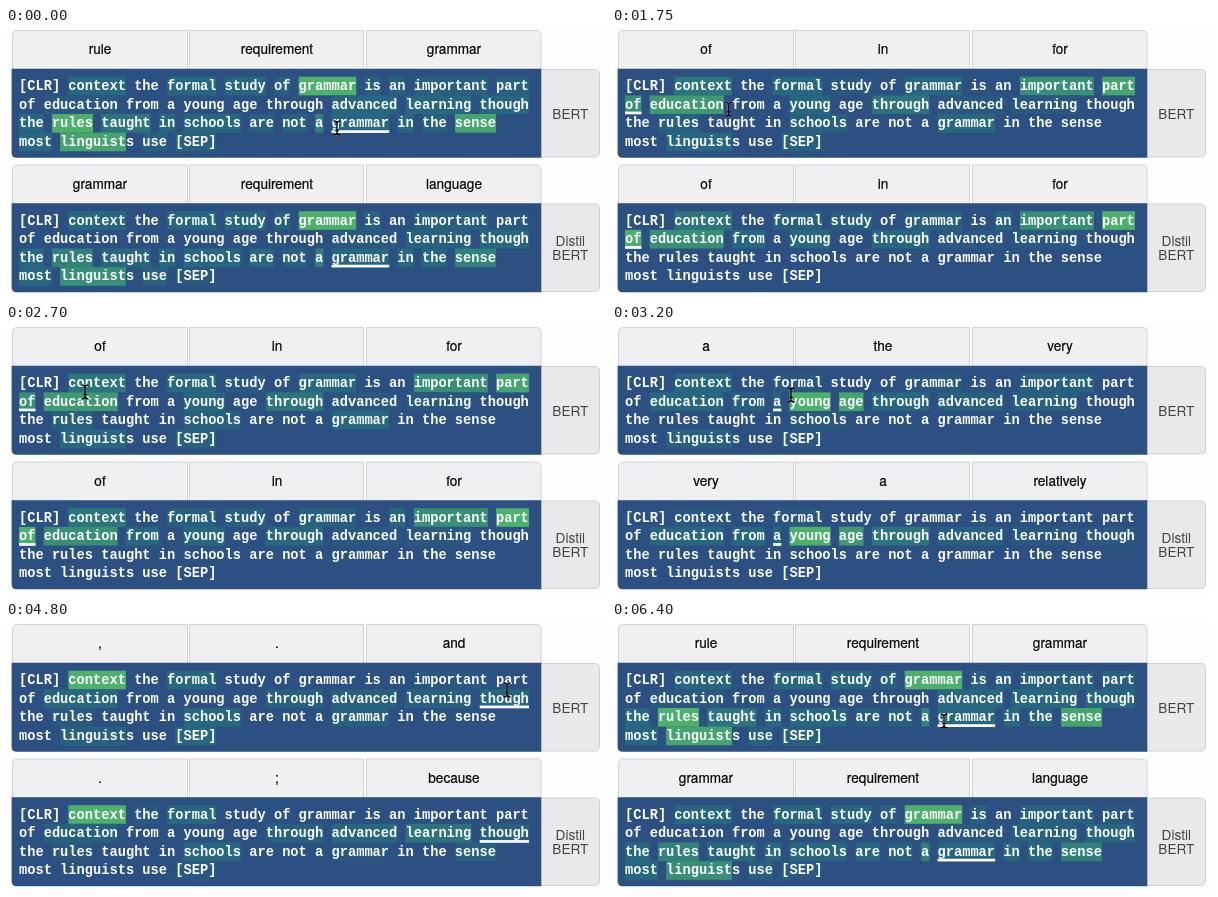
Write an HTML page that moves like this. It is 600x269 px and loops after 6.45 s.

```html
<!DOCTYPE html>
<html lang="en">
<head>
<meta charset="utf-8">
<title>Masked word predictions</title>
<style>
  html, body { margin: 0; width: 100%; height: 100%; overflow: hidden; background: #fdfdfd; }
  svg { display: block; width: 600px; height: 269px; }
  .tab, .side { font: 13.6px "Helvetica Neue", Helvetica, Arial, "Liberation Sans", sans-serif; text-anchor: middle; }
  .tab { fill: #000; stroke: #000; stroke-width: 0.2px; }
  .side { fill: #444; }
  .line { font: bold 13.71px "Courier New", Courier, "Liberation Mono", monospace; fill: #fbfcfd; white-space: pre; }
</style>
</head>
<body>
<svg id="stage" viewBox="0 0 600 269"></svg>
<script>
const LOOP = 6450, TICK = 50;
const LEFT = 13, CHAR = 8.226, TOP = 48.7, ROW = 18.65;
const LINES = [
  '[CLR] context the formal study of grammar is an important part',
  'of education from a young age through advanced learning though',
  'the rules taught in schools are not a grammar in the sense',
  'most linguists use [SEP]'
];

// Levels: a digit sets the strength of the words after it; word2 is a second occurrence.
const SCENES = [
  { word: 'grammar2', panels: [
    ['rule requirement grammar',
     '9 grammar rules 8 sense linguist 5 a2 4 taught 3 context formal study schools in in2 advanced learning though the2 most grammar2 2 of is an important part are not the3 use [SEP] 1 education'],
    ['grammar requirement language',
     '9 grammar 6 linguist 5 rules sense a2 3 context formal study taught schools in in2 though the2 the3 most are grammar2 2 of is important not learning use 1 part advanced [SEP]']
  ] },
  { word: 'schools', panels: [
    ['english context schools',
     '9 context 5 taught 4 learning education study linguist 3 rules grammar2 formal grammar schools are 2 the young important in though s 1 of part advanced'],
    ['context grammar english',
     '9 context 4 taught 3 formal study grammar education rules in are linguist though schools 2 the important young learning from 1 part through [SEP]']
  ] },
  { word: 'of2', panels: [
    ['of in for',
     '8 part 7 education 6 important of2 4 context through 3 formal grammar young grammar2 linguist 2 rules schools [SEP] 1 study advanced learning'],
    ['of in for',
     '9 part of2 6 important education 4 context 3 an from young through 2 formal study grammar 1 advanced learning']
  ] },
  { word: 'a', panels: [
    ['a the very',
     '9 young 8 age 3 context education through a 2 important from advanced learning linguist 1 formal grammar schools [SEP]'],
    ['very a relatively',
     '9 young 7 age 4 through 3 education from a 2 advanced 1 context formal learning though']
  ] },
  { word: 'grammar', panels: [
    ['grammar languages language',
     '8 grammar2 linguist 5 formal study 4 context rules 3 schools of grammar 2 education s though 1 is important learning taught [SEP]'],
    ['grammar languages language',
     '9 grammar2 4 formal study linguist 3 context rules schools grammar 2 of is taught in education 1 important learning are in2']
  ] },
  { word: 'though', panels: [
    [', . and',
     '9 context 3 formal education schools though [SEP] 2 through advanced learning grammar2 linguist 1 rules important'],
    ['. ; because',
     '9 context 4 learning 3 formal advanced schools 2 education through sense though 1 the rules grammar2 [SEP]']
  ] }
];

// time, cursor x, cursor y, scene
const PATH = [
  [0, 331, 100, 0], [900, 214, 102, 1], [2450, 44, 66, 2], [3200, 179, 70, 3],
  [4000, 330, 53, 4], [4800, 501, 68, 5], [6400, 332, 99, 0], [LOOP, 331, 100, 0]
];
const RAMP = [[0, 43, 80, 129], [3, 39, 104, 128], [6, 56, 143, 117], [9, 77, 176, 107]];

const stage = document.getElementById('stage');

function add(parent, tag, attrs, text) {
  const el = document.createElementNS('http://www.w3.org/2000/svg', tag);
  for (const key in attrs) el.setAttribute(key, attrs[key]);
  if (text) el.textContent = text;
  parent.appendChild(el);
  return el;
}

// Box with separate corner radii: top-left, top-right, bottom-right, bottom-left
function box(parent, x, y, w, h, [a, b, c, d], attrs) {
  const path = `M${x + a} ${y}h${w - a - b}q${b} 0 ${b} ${b}v${h - b - c}q0 ${c} ${-c} ${c}` +
    `h${c + d - w}q${-d} 0 ${-d} ${-d}v${a + d - h}q0 ${-a} ${a} ${-a}z`;
  return add(parent, 'path', { d: path, ...attrs });
}

function shade(level) {
  const i = Math.min(2, Math.floor(level / 3));
  const k = (level - RAMP[i][0]) / 3;
  const rgb = [1, 2, 3].map(c => Math.round(RAMP[i][c] + (RAMP[i + 1][c] - RAMP[i][c]) * k));
  return `rgb(${rgb})`;
}

function findTokens() {
  const seen = {}, tokens = {};
  LINES.forEach((line, row) => {
    for (const m of line.matchAll(/linguist|\S+/g)) {
      const n = seen[m[0]] = (seen[m[0]] || 0) + 1;
      tokens[m[0] + (n > 1 ? n : '')] = {
        x: LEFT + m.index * CHAR, y: TOP + row * ROW, w: m[0].length * CHAR
      };
    }
  });
  return tokens;
}

function readLevels(text) {
  const levels = {};
  let level = 0;
  for (const part of text.split(' ')) {
    if (/^\d$/.test(part)) level = +part;
    else levels[part] = level;
  }
  return levels;
}

const tokens = findTokens();

function makePanel(dy, label) {
  const g = add(stage, 'g', { transform: `translate(0 ${dy})` });
  const tabStyle = { fill: '#f0eff1', stroke: '#d3d2d5' };
  box(g, 6.5, 2.5, 175, 39, [5, 0, 0, 0], tabStyle);
  box(g, 183.5, 2.5, 174, 39, [0, 0, 0, 0], tabStyle);
  box(g, 360.5, 2.5, 174.5, 39, [0, 5, 0, 0], tabStyle);
  box(g, 534.5, 41.5, 59, 87.5, [0, 5, 5, 0], { fill: '#e9e8ea', stroke: '#d0cfd2' });
  box(g, 5.6, 40.8, 529.7, 88.9, [0, 0, 0, 5], { fill: shade(0) });
  const tabs = [94, 271, 448].map(x => add(g, 'text', { x, y: 26.2, class: 'tab' }));
  const marks = {};
  for (const name in tokens) {
    const { x, y, w } = tokens[name];
    marks[name] = add(g, 'rect', { x, y, width: w, height: ROW });
  }
  const underline = add(g, 'rect', { height: 2.7, fill: '#fff' });
  LINES.forEach((line, i) =>
    add(g, 'text', { x: LEFT, y: 62 + i * ROW, class: 'line' }, line));
  label.forEach((text, i) =>
    add(g, 'text', { x: 564.3, y: 90.5 + (i - (label.length - 1) / 2) * 14.5, class: 'side' }, text));
  return { tabs, marks, underline };
}

const panels = [makePanel(0, ['BERT']), makePanel(134.5, ['Distil', 'BERT'])];
const cursor = add(stage, 'g', { fill: 'none' });
const beam = 'M-3.5 -7Q-.5 -7 0 -5Q.5 -7 3.5 -7M0 -5.5V5.5M-3.5 7Q-.5 7 0 5Q.5 7 3.5 7M-1.8 2.5H1.8';
add(cursor, 'path', { d: beam, stroke: '#fff', 'stroke-width': 2.4, opacity: 0.35 });
add(cursor, 'path', { d: beam, stroke: '#000', 'stroke-width': 1.4 });

let shown = -1;
function show(index) {
  if (index === shown) return;
  shown = index;
  const scene = SCENES[index];
  const target = tokens[scene.word];
  panels.forEach((panel, i) => {
    const [titles, strengths] = scene.panels[i];
    titles.split(' ').forEach((text, k) => { panel.tabs[k].textContent = text; });
    const levels = readLevels(strengths);
    for (const name in panel.marks) {
      const level = levels[name] || 0;
      panel.marks[name].setAttribute('fill', level ? shade(level) : 'none');
    }
    panel.underline.setAttribute('x', target.x);
    panel.underline.setAttribute('y', target.y + ROW - 2.4);
    panel.underline.setAttribute('width', target.w);
  });
}

function render(time) {
  const t = Math.floor((time % LOOP) / TICK) * TICK;
  const i = PATH.findIndex((p, k) => t < PATH[k + 1][0]);
  const [t0, x0, y0, from] = PATH[i];
  const [t1, x1, y1, to] = PATH[i + 1];
  const k = (t - t0) / (t1 - t0);
  const ease = k * k * (3 - 2 * k);
  show(k < 0.5 ? from : to);
  cursor.setAttribute('transform', `translate(${x0 + (x1 - x0) * ease} ${y0 + (y1 - y0) * ease})`);
}

const start = performance.now();
function frame() {
  render(performance.now() - start);
  requestAnimationFrame(frame);
}
frame();
</script>
</body>
</html>
```
